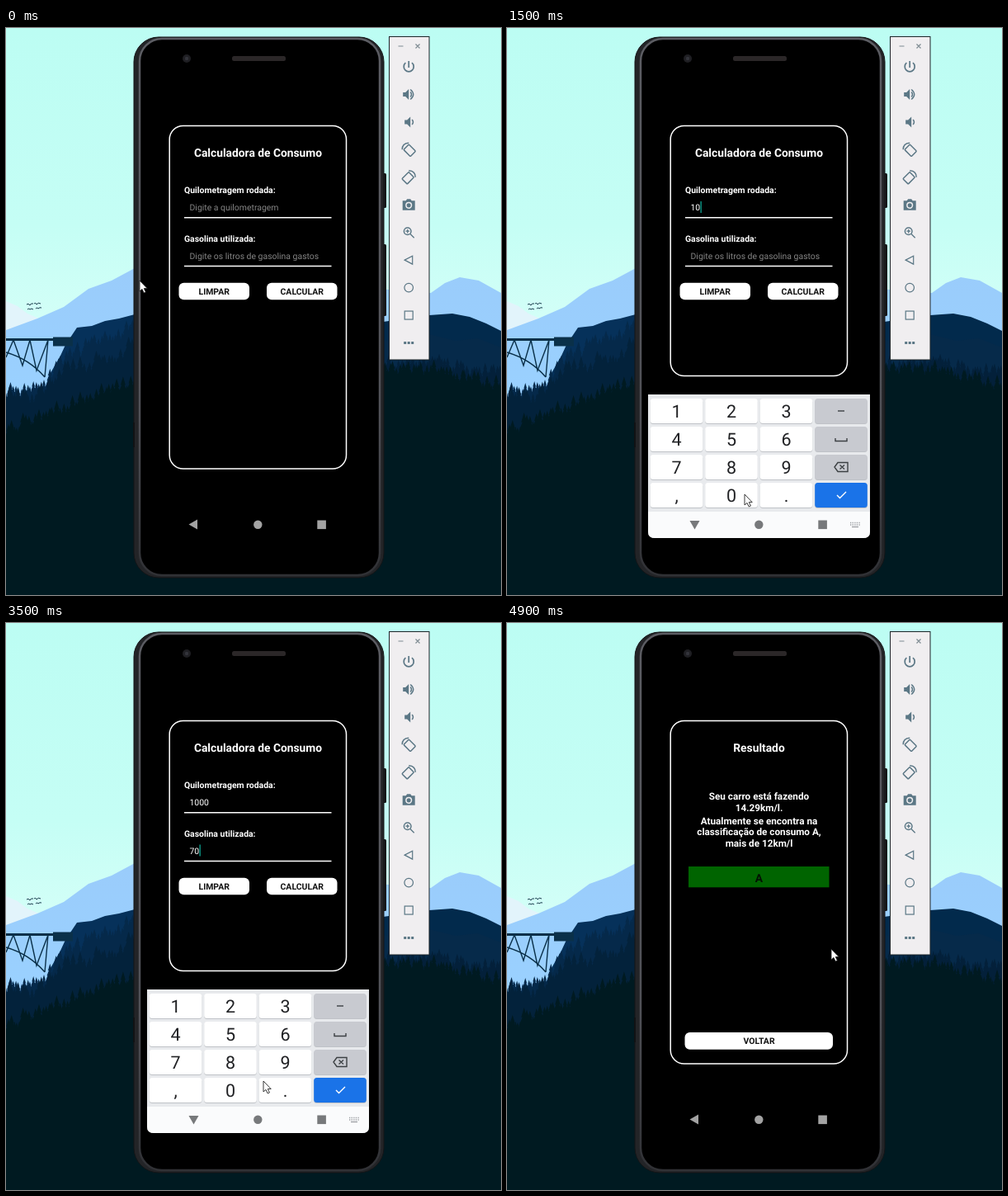
An HTML page for the animation above (5000 ms loop, 600 by 687 pixels).

```html
<!DOCTYPE html>
<html lang="pt">
<head>
<meta charset="utf-8">
<title>Calculadora de Consumo</title>
<style>
html, body { margin: 0; width: 100%; height: 100%; overflow: hidden; background: #001a20; }
svg { display: block; width: 600px; height: 687px; font-family: Roboto, Arial, sans-serif; text-rendering: geometricPrecision; }
.title { font: 700 13.8px Roboto, sans-serif; }
.bold { font: 700 10.45px Roboto, sans-serif; }
.field { font: 400 10.45px Roboto, sans-serif; }
.body { font: 700 11.72px Roboto, sans-serif; }
.digit { font: 400 21.5px Roboto, sans-serif; fill: #202124; }
.mid { text-anchor: middle; }
.line { fill: none; stroke: #5b7785; stroke-width: 1.5; }
</style>
</head>
<body>
<svg viewBox="0 0 600 687" xmlns="http://www.w3.org/2000/svg">
  <defs>
    <linearGradient id="sky" x2="0" y2="1">
      <stop offset="0" stop-color="#bcfdf3"/>
      <stop offset=".6" stop-color="#c5fef5"/>
      <stop offset="1" stop-color="#d8fff8"/>
    </linearGradient>
    <linearGradient id="far" x2="0" y2="1">
      <stop offset="0" stop-color="#9accfb"/>
      <stop offset="1" stop-color="#9ad1ff"/>
    </linearGradient>
    <linearGradient id="edge" x2="0" y2="1">
      <stop offset="0" stop-color="#5c5d63"/>
      <stop offset=".7" stop-color="#505157"/>
      <stop offset="1" stop-color="#303135"/>
    </linearGradient>
    <clipPath id="screen"><path d="M171 70H440V610q0 8-8 8H179q-8 0-8-8Z"/></clipPath>
  </defs>

  <rect width="600" height="400" fill="url(#sky)"/>
  <path d="M0 331L14 337 26 346 40 352V380H0Z" fill="#e2f4fb"/>
  <path d="M0 366L38 352 70 338 100 316 128 306 156 291V450H0Z
           M450 316L515 321 532 309 550 302 573 306 600 321V450H450Z" fill="url(#far)"/>
  <path d="M25 335q2-2 4 1 1-3 4-2M34 334q2-2 3 1 2-3 5-1M26 341q2-2 3 0 2-2 4 0M36 340q2-2 3 0 2-2 4-1"
        fill="none" stroke="#17384a"/>
  <path d="M42 450L54 418 66 397 72 384 86 363 104 361 120 355 137 352 156 347V450Z" fill="#06315a"/>
  <path d="M450 357L513 348 541 346 562 350 582 358 600 367V470H450Z" fill="#022a4c"/>
  <path d="M450 380L513 371 545 379 572 376 600 387V470H450Z" fill="#062a4a"/>
  <g fill="none" stroke="#0a3049" stroke-width="1.4">
    <path d="M0 377.5H60" stroke-width="3"/>
    <path d="M0 399L9 378 20 409 29 378 37 415 51 378 47 423M0 393Q28 401 47 423"/>
    <path d="M57 380H81" stroke-width="11"/>
  </g>
  <g id="woods"></g>

  <rect x="456" y="176" width="5" height="42" rx="1.5" fill="#17181a"/>
  <rect x="456" y="262" width="5" height="87" rx="1.5" fill="#17181a"/>
  <rect x="155" y="11" width="303" height="655" rx="30" fill="#232427" stroke="#141517"/>
  <rect x="162" y="13" width="291" height="650" rx="27" stroke="url(#edge)" stroke-width="2.500"/>
  <path d="M155 478V508" stroke="#111214" stroke-width="2"/>
  <circle cx="219" cy="37" r="5" fill="#1f1f23"/>
  <circle cx="219" cy="37" r="2.200" fill="#33343b"/>
  <rect x="274" y="34" width="65" height="6" rx="2.500" fill="#2b2728"/>

  <rect id="card" x="198.200" y="118.500" width="214.300" height="415.500" rx="16.500" fill="#000" stroke="#fff" stroke-width="1.5"/>
  <g id="form" fill="#fff">
    <text class="title mid" x="305.500" y="155.500">Calculadora de Consumo</text>
    <text class="bold" x="216" y="200">Quilometragem rodada:</text>
    <text class="field" x="222.500" y="220.800" id="km"></text>
    <text class="bold" x="216" y="258.700">Gasolina utilizada:</text>
    <text class="field" x="222.500" y="279.500" id="gas"></text>
    <path d="M216 229.800H394.500M216 288.600H394.500" stroke="#fff" stroke-width="1.5"/>
    <rect x="209.500" y="308.700" width="85.500" height="20.600" rx="6"/>
    <rect x="316" y="308.700" width="85.500" height="20.600" rx="6"/>
    <g class="bold mid" fill="#111">
      <text x="252.200" y="323.400">LIMPAR</text>
      <text x="358.700" y="323.400">CALCULAR</text>
    </g>
    <rect id="caret" width="1.500" height="14" fill="#0c8f80"/>
  </g>
  <g id="result" fill="#fff">
    <text class="title mid" x="305.500" y="155.500">Resultado</text>
    <g class="body mid" id="report"></g>
    <g id="grade">
      <rect x="220" y="295" width="170.500" height="25.300" fill="#006400"/>
      <text class="title mid" x="305.500" y="314" fill="#031203">A</text>
    </g>
    <g id="back">
      <rect x="215.500" y="383.300" width="179.500" height="20.800" rx="6"/>
      <text class="bold mid" x="305.500" y="397.800" fill="#111">VOLTAR</text>
    </g>
  </g>

  <g clip-path="url(#screen)">
    <g id="pad">
      <rect x="171" y="444" width="269" height="180" fill="#e8eaed"/>
      <rect x="171" y="586" width="269" height="40" fill="#fafbfc"/>
      <g id="keys"></g>
    </g>
  </g>
  <g id="nav" fill="#a3a3a3">
    <path id="arrow" d="M-6 0L4.500-6V6Z"/>
    <circle cx="305.300" cy="601.700" r="5.200"/>
    <rect x="377.300" y="596.500" width="10.600" height="10.600"/>
  </g>
  <g id="ime" fill="none" stroke="#9a9da1" stroke-width="1.300">
    <path d="M416 599.500H428M416 602H428" stroke-dasharray="1.300 1.300"/>
    <path d="M418 604.500H426"/>
  </g>

  <rect x="464.500" y="10.500" width="48.500" height="391.500" fill="#f0eef0" stroke="#1d2529"/>
  <path d="M475.500 22H481.500M496.500 19.500L501.500 24.500M501.500 19.500L496.500 24.500" stroke="#7d8a91" stroke-width="1.200"/>
  <g id="tools"></g>
  <path id="mouse" d="M0 0V13L3 10.400 5.200 15 7.400 14 5.300 9.600H9.200Z" fill="#fff" stroke="#222" stroke-width=".9"/>
</svg>
<script>
const LOOP = 5000;
const $ = id => document.getElementById(id);
const set = (id, name, value) => $(id).setAttribute(name, value);
const show = (id, on) => set(id, 'display', on ? 'inline' : 'none');
const clamp = x => Math.min(1, Math.max(0, x));
const ease = x => x * x * (3 - 2 * x);
const text = (y, s) => `<text x="305.5" y="${y}">${s}</text>`;

function random(seed) {
  return () => (seed = (seed * 16807) % 2147483647) / 2147483647;
}

// A row of fir trees standing along a broken line
function firs(line, size, fill, seed) {
  const rnd = random(seed);
  let d = '';
  for (let i = 0; i < line.length - 1; i++) {
    const [x0, y0] = line[i], [x1, y1] = line[i + 1];
    for (let x = x0; x < x1; x += 2 + rnd() * 3) {
      const y = y0 + (y1 - y0) * (x - x0) / (x1 - x0);
      const h = size * (.35 + rnd() * .65), w = h * .23;
      d += `M${x} ${y - h}l${w * .5} ${h * .4}h${-w * .2}l${w * .5} ${h * .3}h${-w * .2}l${w * .5} ${h * .4}` +
           `H${x - w * 1.1}l${w * .5} ${-h * .4}h${-w * .2}l${w * .5} ${-h * .3}h${-w * .2}Z`;
    }
  }
  const first = line[0], last = line[line.length - 1];
  const base = `M${first[0]} 687L${line.join(' ')} ${last[0]} 687Z`;
  return `<path d="${base}${d}" fill="${fill}"/>`;
}

const soil = '#001a21';
$('woods').innerHTML =
  firs([[0, 450], [46, 442], [66, 418], [88, 400], [120, 386], [157, 372]], 22, '#05294a', 11) +
  firs([[0, 462], [40, 454], [75, 430], [110, 420], [157, 400]], 30, '#03223b', 29) +
  firs([[450, 418], [520, 415], [560, 424], [600, 428]], 22, '#03203a', 47) +
  firs([[0, 504], [40, 488], [90, 468], [157, 442]], 30, soil, 71) +
  firs([[450, 428], [515, 424], [555, 436], [600, 444]], 24, soil, 83) +
  `<rect y="503" width="600" height="184" fill="${soil}"/>`;

const labels = ['1', '2', '3', '-', '4', '5', '6', 'space', '7', '8', '9', 'del', ',', '0', '.', 'ok'];
const glyphs = {
  '-': '<path d="M-4 0H4"/>',
  space: '<path d="M-7-1V2.500H7V-1"/>',
  del: '<path d="M-8 0L-4-5.500H8V5.500H-4ZM-1.500-2.500L4 2.500M4-2.500L-1.500 2.500"/>',
  ok: '<path d="M-5 0L-1.500 3.500 6-4"/>'
};
$('keys').innerHTML = labels.map((s, i) => {
  const x = 173.7 + i % 4 * 66.5, y = 449 + Math.floor(i / 4) * 34;
  const fill = s === 'ok' ? '#1a73e8' : glyphs[s] ? '#c8cad0' : '#fff';
  const mark = glyphs[s]
    ? `<g transform="translate(${x + 31.8} ${y + 15})" fill="none" stroke="${s === 'ok' ? '#fff' : '#3c4043'}" stroke-width="1.4">${glyphs[s]}</g>`
    : `<text class="digit mid" x="${x + 31.8}" y="${y + 23}">${s}</text>`;
  return `<rect x="${x}" y="${y + 1}" width="63.6" height="30" rx="3.5" fill="#bfc2c7"/>` +
         `<rect x="${x}" y="${y}" width="63.6" height="30" rx="3.5" fill="${fill}"/>${mark}`;
}).join('');

const speaker = x => `<path d="M${x}-2.500h3l4-4v13l-4-4h-3Z" fill="#5b7785" stroke="none"/>`;
const turn = '<rect x="-4.500" y="-5.800" width="9" height="11.600" rx="1" transform="translate(1 1) rotate(-45)"/><path d="M-8 0Q-8-7.500 0-8"/>';
const tools = [
  '<path d="M0-7V1M-3.800-4.800A6 6 0 1 0 3.800-4.800" stroke-width="1.700"/>',
  speaker(-7) + '<path d="M2-3Q4.500 0 2 3M2-6Q9 0 2 6"/>',
  speaker(-5) + '<path d="M4-3Q6.500 0 4 3"/>',
  turn,
  `<g transform="scale(-1 1)">${turn}</g>`,
  '<path d="M-7.500-5h4l1.500-2h4l1.500 2h4V6.500h-15Z" fill="#5b7785" stroke="none"/><circle cy=".6" r="3.300" stroke="#f0eef0"/>',
  '<circle cx="-1.500" cy="-1.500" r="4.300"/><path d="M1.800 1.800L6.500 6.500M-3.800-1.500H.8M-1.500-3.800V.8" stroke-width="1.300"/>',
  '<path d="M-5 0L4.500-5V5Z" stroke-width="1.200"/>',
  '<circle r="5.300" stroke-width="1.200"/>',
  '<rect x="-5" y="-5" width="10" height="10" stroke-width="1.200"/>',
  '<path d="M-6 0h3M-1.500 0h3M3 0h3" stroke-width="3"/>'
];
$('tools').innerHTML = tools.map((s, i) =>
  `<g class="line" transform="translate(488.2 ${47 + i * 33.45})">${s}</g>`).join('');

// time, x, y of the pointer tip
const path = [
  [0, 162, 306], [100, 165, 304], [350, 262, 219], [500, 262, 219], [700, 245, 278],
  [1000, 208, 464], [1150, 208, 464], [1380, 288, 565], [2000, 288, 565],
  [2420, 262, 276], [2560, 262, 276], [2800, 250, 480], [3000, 211, 535],
  [3130, 211, 535], [3320, 284, 568], [3420, 284, 568], [3500, 312, 555],
  [3820, 356, 321], [3920, 356, 321], [4000, 341, 318], [4250, 344, 325],
  [4700, 393, 395], [LOOP, 393, 395]
];
const typed = (steps, t) => steps.reduce((s, [at, value]) => t >= at ? value : s, '');
const kmSteps = [[1100, '1'], [1400, '10'], [1600, '100'], [1800, '1000']];
const gasSteps = [[3100, '7'], [3400, '70']];

function fill(id, value, hint) {
  $(id).textContent = value || hint;
  set(id, 'fill', value ? '#fff' : '#858585');
}

function pointer(t) {
  const i = Math.max(1, path.findIndex(p => p[0] > t));
  const [t0, x0, y0] = path[i - 1], [t1, x1, y1] = path[i];
  const k = ease((t - t0) / (t1 - t0));
  set('mouse', 'transform', `translate(${x0 + (x1 - x0) * k} ${y0 + (y1 - y0) * k})`);
}

function render(t) {
  const rise = 1 - (1 - clamp((t - 450) / 300)) ** 3;
  const drop = clamp((t - 4010) / 230) ** 2;
  const up = rise * (1 - drop);
  const short = t >= 600 && t < 4100;
  const done = t >= 3950, ready = t >= 4100;

  set('pad', 'transform', `translate(0 ${176 * (1 - up)})`);
  show('pad', up > 0);
  set('nav', 'fill', up > .2 ? '#77797b' : '#a3a3a3');
  const angle = -90 * ease(clamp((t - 480) / 310)) * (1 - ease(clamp((t - 4010) / 250)));
  set('arrow', 'transform', `translate(227.5 601.5) rotate(${angle})`);
  show('ime', t >= 650 && t < 3980);

  set('card', 'height', short ? 303 : 415.5);
  show('form', !done);
  show('result', done);
  show('grade', ready);
  set('back', 'transform', `translate(0 ${short ? 0 : 112.6})`);
  $('report').innerHTML = ready
    ? text(214.2, 'Seu carro está fazendo') + text(227.9, '14.29km/l.') + text(243.6, 'Atualmente se encontra na') +
      text(257.3, 'classificação de consumo A,') + text(271, 'mais de 12km/l')
    : text(214.2, 'Seu carro está fazendo 0.00km/') + text(227.9, 'l.') + text(243.6, 'Atualmente se encontra na') +
      text(257.3, 'classificação de consumo ,');

  const km = typed(kmSteps, t), gas = typed(gasSteps, t);
  fill('km', km, 'Digite a quilometragem');
  fill('gas', gas, 'Digite os litros de gasolina gastos');
  const second = t >= 2500;
  const idle = t >= 2300 && t < 2500 || t >= 2700 && t < 3100;
  show('caret', t >= 450 && !idle);
  set('caret', 'x', 222.5 + (second ? gas : km).length * 5.95);
  set('caret', 'y', second ? 268.5 : 210);
  pointer(t);
}

const start = performance.now();
function tick() {
  render((performance.now() - start) % LOOP);
  requestAnimationFrame(tick);
}
tick();
</script>
</body>
</html>
```
